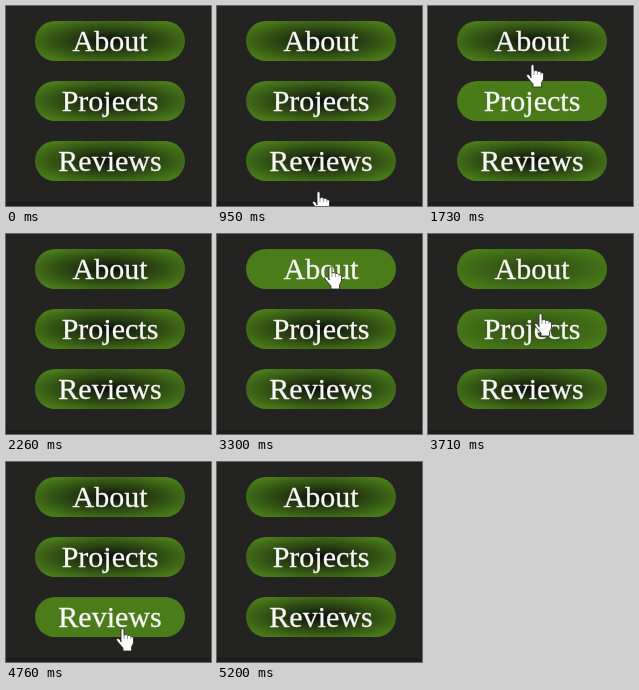
Animation, 205 px wide and 200 px high, one loop 6.23 s. Source, as an HTML page:

```html
<!DOCTYPE html>
<html lang="en">
<head>
<meta charset="utf-8">
<title>Glowing menu</title>
<style>
  html, body { margin: 0; width: 100%; height: 100%; overflow: hidden; background: #232322; }
  #stage { position: absolute; left: 0; top: 0; width: 205px; height: 200px; overflow: hidden; }
  #floor { position: absolute; left: 0; right: 0; top: 196px; height: 4px; background: #211b20; }
  .item {
    position: absolute; left: 29px; width: 150px; height: 40px; border-radius: 20px;
    color: #f8f8f8; text-align: center; -webkit-text-stroke: .3px #f8f8f8;
    font: 30px/40px "Liberation Serif", "Times New Roman", serif;
  }
  #hand { position: absolute; left: 0; top: 0; width: 18px; height: 24px; overflow: visible; }
</style>
</head>
<body>
<div id="stage">
  <div id="floor"></div>
  <svg id="hand" viewBox="0 0 18 24">
    <path fill="#fff" stroke="#222" stroke-width=".8" stroke-linejoin="round" d="M5 14V2Q5 .5 6.5 .5T8 2V7Q10.5 5.5 11.5 7.5Q14 6.5 14.8 8.5Q17.5 8 17.5 10.5V15L15.5 19V23H7V20L1 13Q0 11 1.5 10.3Q3 10 5 13Z"/>
    <path fill="none" stroke="#777" stroke-width=".7" d="M8 7V11M11.5 7.5V11M14.8 8.5V11"/>
  </svg>
</div>
<script>
  const LOOP = 6230, FADE = 250;
  const ROW = 60, FIRST_ROW = 5, GAP = 10;
  const DARK = [12, 14, 12], GREEN = [74, 125, 25];

  // Key points of the fingertip, one list for each pass over the menu
  const passes = [
    [{ t: 860, x: 101, y: 199 }, { t: 1410, x: 103, y: 117 }, { t: 2190, x: 106, y: -24 }],
    [{ t: 2800, x: 114, y: -24 }, { t: 3300, x: 113, y: 33 }, { t: 4070, x: 111, y: 121 },
     { t: 4620, x: 116, y: 167 }, { t: 4760, x: 116, y: 167 }, { t: 5040, x: 118, y: 201 }]
  ];

  const stage = document.getElementById('stage');
  const hand = document.getElementById('hand');
  const clamp = v => Math.min(1, Math.max(0, v));
  const ease = v => v * v * (3 - 2 * v);
  const mix = (a, b, k) => a + (b - a) * k;

  // Value of one field along a pass where another field equals v
  function along(pass, from, v, to) {
    for (let i = 1; i < pass.length; i++) {
      const a = pass[i - 1], b = pass[i];
      const k = (v - a[from]) / (b[from] - a[from]);
      if (k >= 0 && k <= 1) return mix(a[to], b[to], k);
    }
  }

  const items = ['About', 'Projects', 'Reviews'].map((label, i) => {
    const el = document.createElement('div');
    const top = FIRST_ROW + i * ROW;
    el.className = 'item';
    el.textContent = label;
    el.style.top = `${top + GAP}px`;
    stage.insertBefore(el, hand);
    const spans = passes.map(pass =>
      [top, top + ROW].map(y => along(pass, 'y', y, 't')).sort((a, b) => a - b));
    return { el, spans };
  });

  function hoverLevel(spans, t) {
    const levels = spans.map(([enter, leave]) =>
      clamp(Math.min((t - enter) / FADE, 1 - (t - leave) / FADE)));
    return ease(Math.max(...levels));
  }

  function draw(t) {
    for (const { el, spans } of items) {
      const level = hoverLevel(spans, t);
      const core = DARK.map((c, i) => Math.round(mix(c, GREEN[i], level)));
      el.style.background = `radial-gradient(rgb(${core}), rgb(${GREEN}) 85%)`;
    }
    const pass = passes.find(p => t >= p[0].t && t < p[p.length - 1].t);
    hand.style.display = pass ? 'block' : 'none';
    if (pass) {
      const [x, y] = ['x', 'y'].map(axis => Math.round(along(pass, 't', t, axis)));
      hand.style.transform = `translate(${x - 6}px, ${y - 1}px)`;
    }
  }

  let start;
  function tick(now) {
    start ??= now;
    draw((now - start) % LOOP);
    requestAnimationFrame(tick);
  }
  draw(0);
  requestAnimationFrame(tick);
</script>
</body>
</html>
```
